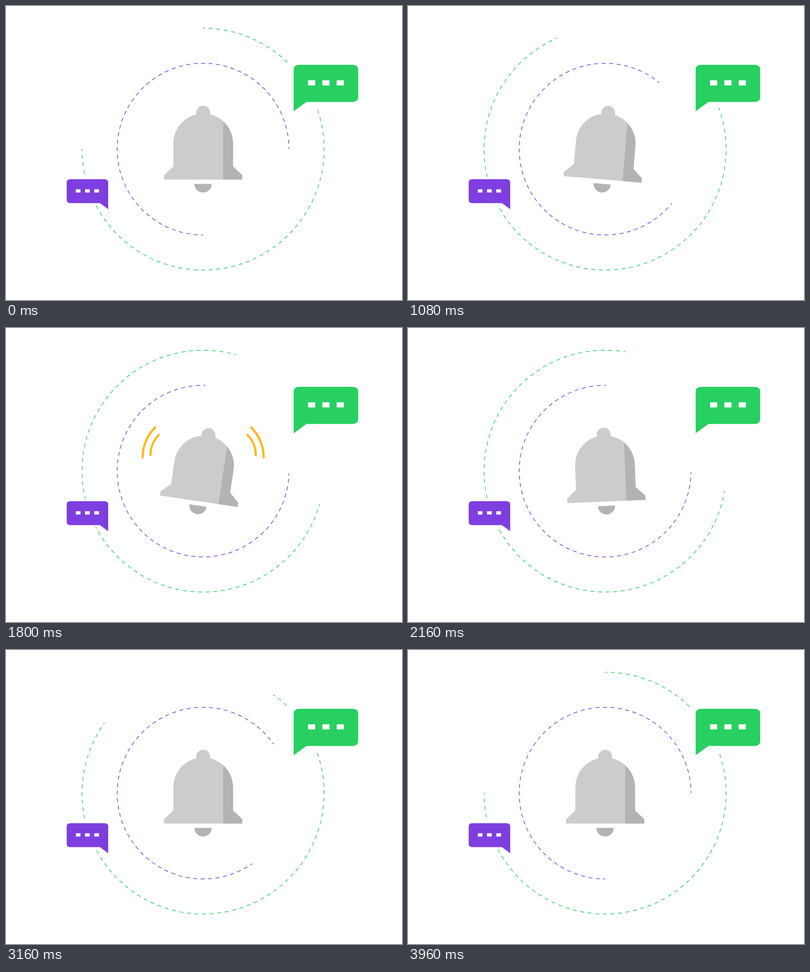
An HTML page for the animation above (4 s loop, 868x645 px).

```html
<!DOCTYPE html>
<html lang="en">
<head>
<meta charset="utf-8">
<title>Notification bell</title>
<style>
  html, body { margin: 0; width: 100%; height: 100%; overflow: hidden; background: #fff; }
  svg { display: block; width: 100%; height: 100%; }
  .ring { fill: none; stroke-width: 1.5; }
  .waves { fill: none; stroke: #fdb614; stroke-width: 4.6; stroke-linecap: round; }
</style>
</head>
<body>
<svg viewBox="0 0 868 645">
  <!-- Three-quarter rings; half a dash sits at each end -->
  <path id="outer" class="ring" stroke="#27ce62" pathLength="270"
        stroke-dasharray="1.9 1.7" stroke-dashoffset=".95"
        d="M432 48.7A265.3 265.3 0 1 1 166.7 314"/>
  <path id="inner" class="ring" stroke="#7f3fe0" pathLength="270"
        stroke-dasharray="2.7 2.3" stroke-dashoffset="1.35"
        d="M432 502.3A188.3 188.3 0 1 1 620.3 314"/>

  <!-- Clearance around the bubbles -->
  <path fill="#fff" d="M621 118H782V223H621ZM128 375H229V436H128Z"/>

  <path fill="#27d061" d="M630.5 231V140Q630.5 129 644 129H758.5Q772 129 772 140V199.5Q772 210.5 758.5 210.5H658.5Z"/>
  <path fill="#fff" d="M662 163h15.7v11.3h-15.7zM693.4 163h15.7v11.3h-15.7zM724.8 163h15.7v11.3h-15.7z"/>
  <path fill="#7f3fe0" d="M224 445.7V387Q224 380 215.5 380H141.5Q133 380 133 387V425.5Q133 432.5 141.5 432.5H206Z"/>
  <path fill="#fff" d="M153 402h10.2v7.2h-10.2zM173.3 402h10.2v7.2h-10.2zM193.6 402h10.2v7.2h-10.2z"/>

  <g id="bell">
    <path fill="#ccc" d="M417 250V234A15.2 15.2 0 0 1 447.4 234V250Z"/>
    <path fill="#ccc" d="M366.8 352V301A65.4 65 0 0 1 497.6 301V352L518 371.3V380.7H346.5V371.3Z"/>
    <path fill="#b3b3b3" d="M476 253A65.4 65 0 0 1 497.6 301V352L518 371.3V380.7H476Z"/>
    <path fill="#b3b3b3" d="M413 390.3H451A19 19 0 0 1 413 390.3Z"/>
  </g>

  <g id="waves" class="waves">
    <path id="wave" d="M327 218A93 93 0 0 0 299.5 284M335 234.5A63 63 0 0 0 316.8 279"/>
    <use href="#wave" transform="translate(864.3) scale(-1 1)"/>
  </g>
</svg>
<script>
  const LOOP = 4000, STEP = 40;
  const byId = id => document.getElementById(id);
  const [outer, inner, bell, waves] = ["outer", "inner", "bell", "waves"].map(byId);

  const ramp = (t, from, to) => Math.min(1, Math.max(0, (t - from) / (to - from)));
  const ease = u => u * u * (3 - 2 * u);
  const outAndBack = (t, peak) => ease(t < peak ? t / peak : (LOOP - t) / (LOOP - peak));
  const rotate = (el, angle) => el.setAttribute("transform", `rotate(${angle} 432 314)`);

  // Two full swings, at rest before and after
  const swing = t => 9.8 * Math.sin(4 * Math.PI * ramp(t, 1033, 2182));

  function draw(now) {
    const t = Math.floor((now % LOOP) / STEP) * STEP;
    rotate(outer, 106 * outAndBack(t, 1838));
    rotate(inner, -91 * outAndBack(t, 2000));
    rotate(bell, swing(t));
    waves.setAttribute("opacity", ramp(t, 1160, 1280) * (1 - ramp(t, 1960, 2080)));
  }

  const start = performance.now();
  function tick() {
    draw(performance.now() - start);
    requestAnimationFrame(tick);
  }
  tick();
</script>
</body>
</html>
```
